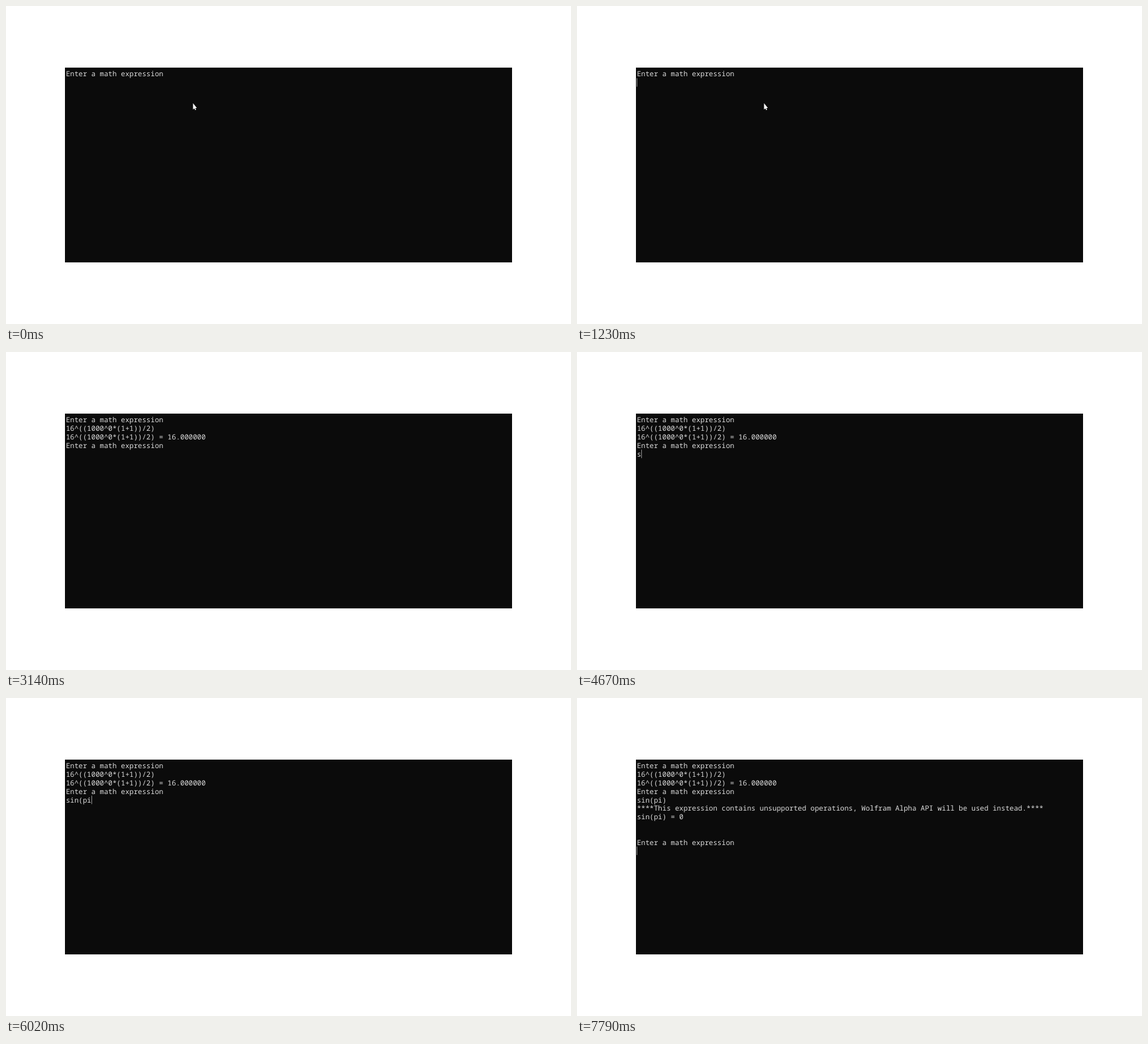
Animation of 853x480 px, one loop 8000 ms. Source, as an HTML page:

```html
<!DOCTYPE html>
<html lang="en">
<head>
<meta charset="utf-8">
<title>Terminal calculator</title>
<style>
  html, body { margin: 0; width: 100%; height: 100%; overflow: hidden; background: #fff; }
  svg { display: block; width: 853px; height: 480px; }
  text {
    font: 500 10.667px "Noto Sans Mono", "DejaVu Sans Mono", monospace;
    fill: #dcdcdc;
    white-space: pre;
    text-rendering: geometricPrecision;
  }
</style>
</head>
<body>
<svg viewBox="0 0 853 480">
  <rect x="89" y="93" width="675" height="294" fill="#0b0b0b"/>
  <g id="lines"></g>
  <rect id="caret" width="1" height="12.8" fill="#888"/>
  <path id="pointer" fill="#fff" d="M282.4 146.8V156.2L284.4 154.4L285.7 157.2L287 156.6L285.8 153.9H288.2Z"/>
</svg>
<script>
const LOOP = 8000, LEFT = 90.4, TOP = 96.2, CHAR = 6.4, ROW = 12.8, BASELINE = 10.1;

const prompt = "Enter a math expression\n";
const sum = "16^((1000^0*(1+1))/2)";
const typing = prompt + sum + "\n" + sum + " = 16.000000\n" + prompt;
const answer = typing + "sin(pi)\n****This expression contains unsupported operations, " +
  "Wolfram Alpha API will be used instead.****\nsin(pi) = ";
const done = answer + "0\n\n\n" + prompt;

// [start ms, screen text, caret visible]
const steps = [
  [0, prompt, false],
  [200, prompt, true],
  [770, prompt, false],
  [1230, prompt, true],
  [1430, prompt + sum, true],
  [2020, prompt + sum, false],
  [2550, typing, true],
  [3140, typing, false],
  [3740, typing, true],
  [4270, typing, false],
  [4670, typing + "s", true],
  [4800, typing + "si", true],
  [5050, typing + "sin", true],
  [5310, typing + "sin(", true],
  [5770, typing + "sin(p", true],
  [5900, typing + "sin(pi", true],
  [6150, typing + "sin(pi)", true],
  [6740, answer, true],
  [7000, done, true],
  [7330, done, false],
  [7790, done, true]
];
const POINTER_HIDES = 2550;

const $ = id => document.getElementById(id);
const rows = Array.from({ length: 11 }, (_, i) => {
  const el = document.createElementNS("http://www.w3.org/2000/svg", "text");
  el.setAttribute("x", LEFT);
  el.setAttribute("y", TOP + i * ROW + BASELINE);
  return $("lines").appendChild(el);
});
const show = (el, on) => el.setAttribute("visibility", on ? "visible" : "hidden");

let shown = null;
function draw(time) {
  const step = steps.findLast(s => s[0] <= time);
  if (step === shown) return;
  shown = step;
  const lines = step[1].split("\n");
  rows.forEach((el, i) => { el.textContent = lines[i] || ""; });
  const last = lines.length - 1;
  $("caret").setAttribute("x", Math.round(LEFT + lines[last].length * CHAR - 0.2));
  $("caret").setAttribute("y", TOP + last * ROW);
  show($("caret"), step[2]);
  show($("pointer"), time < POINTER_HIDES);
}

const start = performance.now();
function tick() {
  draw((performance.now() - start) % LOOP);
  requestAnimationFrame(tick);
}
tick();
</script>
</body>
</html>
```
